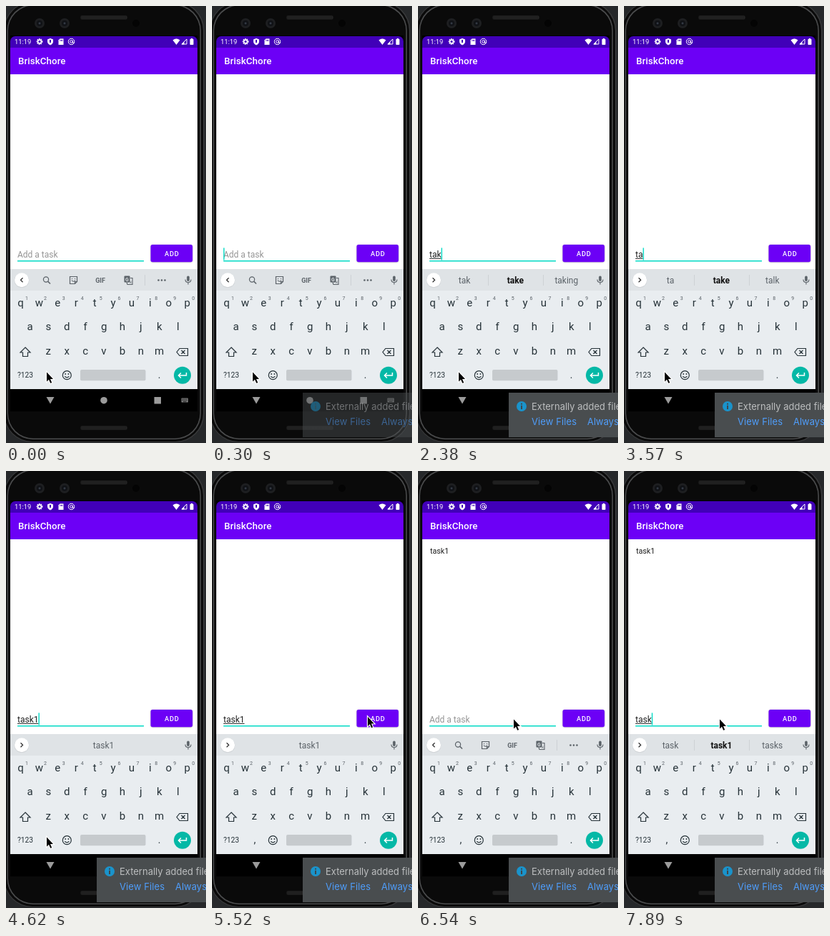
Write an HTML page with a canvas that moves like this. It is 280 px wide and 608 px high and loops after 8000 ms.

```html
<!DOCTYPE html>
<html lang="en">
<head>
<meta charset="utf-8">
<style>
  html, body { margin: 0; width: 280px; height: 608px; overflow: hidden; background: #26282a; }
  canvas { display: block; }
</style>
</head>
<body>
<canvas id="stage" width="280" height="608"></canvas>
<script>
const ctx = document.getElementById('stage').getContext('2d');
const LOOP = 8000;
const KEY = '#263238', ICON = '#5b6268', TEAL = '#03dac5', PURPLE = '#6c00f6';

// time, typed text, caret visible, suggestions
const typing = [
  [0, '', 0], [300, '', 1], [890, '', 0], [1490, '', 1],
  [1940, 't', 1, 't to the'], [2090, 'ta', 1, 'ta take talk'],
  [2230, 'tak', 1, 'ta take talk'], [2380, 'tak', 1, 'tak take taking'],
  [2530, 'taks', 1, 'taks takes talks'], [3130, 'taks', 0, 'taks takes talks'],
  [3280, 'tak', 1, 'tak take taking'], [3570, 'ta', 1, 'ta take talk'],
  [4020, 'task', 1, 'task tasks talk'], [4620, 'task1', 1, 'task1'],
  [5220, 'task1', 0, 'task1'], [5960, '', 1], [6540, '', 0],
  [6990, 't', 1, 't to the'], [7140, 'ta', 1, 'ta take talk'],
  [7590, 'tas', 1, 'tas task talk'], [7890, 'task', 1, 'task task1 tasks']
];
// time, pointer x, pointer y
const pointer = [[0, 57, 509.5], [5370, 150, 421], [5520, 218, 342], [6390, 178, 345], [6540, 134, 345.5]];
// time, ripple radius, ripple opacity
const ripple = [[0, 0, 0], [5660, 14, .25], [5810, 32, .28], [5960, 50, .2], [6100, 50, .1], [6240, 0, 0]];

const at = (steps, t) => steps.findLast(s => s[0] <= t);

function rect(x, y, w, h, fill, r = 0) {
  ctx.fillStyle = fill;
  ctx.beginPath();
  ctx.roundRect(x, y, w, h, r);
  ctx.fill();
}

function circle(x, y, r, fill) {
  rect(x - r, y - r, 2 * r, 2 * r, fill, r);
}

function draw(d, x, y, fill, stroke, width = 1.2) {
  const path = new Path2D(d);
  ctx.save();
  ctx.translate(x, y);
  if (stroke) {
    ctx.strokeStyle = stroke;
    ctx.lineWidth = width;
    ctx.stroke(path);
  }
  if (fill) {
    ctx.fillStyle = fill;
    ctx.fill(path);
  }
  ctx.restore();
}

function ring(x, y, r, color, width = 1.2) {
  draw(`M${r} 0A${r} ${r} 0 1 1 ${-r} 0A${r} ${r} 0 1 1 ${r} 0`, x, y, null, color, width);
}

function text(s, x, y, size, color, { weight = 400, align = 'left', font = 'Roboto', spacing = 0 } = {}) {
  ctx.font = `${weight} ${size}px ${font}, sans-serif`;
  ctx.letterSpacing = spacing + 'px';
  ctx.textAlign = align;
  ctx.fillStyle = color;
  ctx.fillText(s, x, y);
  return ctx.measureText(s).width;
}

function grille(y) {
  rect(104, y, 66, 6, '#1b1b1b', 3);
  for (let i = 0; i < 32; i++)
    for (let j = 0; j < 2; j++) rect(106 + i * 2, y + 1.5 + j * 2, 1, 1, '#303030');
}

function phone() {
  rect(0, 0, 280, 608, '#26282a');
  rect(-3, -6, 280.5, 613, '#3a3b3c', 40);
  rect(-2, -5, 278, 611, '#0a0a0a', 39);
  rect(1.5, -2, 271.5, 605, '#4b4c4d', 36);
  rect(3, -.5, 268.5, 602, '#0a0a0a', 35);
  grille(13);
  grille(584);
  for (const x of [47, 82]) {
    circle(x, 24, 7, '#1e1f21');
    circle(x, 24, 4, '#101216');
    circle(x, 24, 1.5, '#343a45');
  }
  circle(182, 24, 5, '#040404');
  rect(6, 41, 262, 523, '#000');
}

function statusBar() {
  rect(6, 42, 262, 16, '#4100b8', [7, 7, 0, 0]);
  text('11:19', 12, 53, 9.3, '#fff');
  ctx.setLineDash([1.5, 1.1]);
  ring(47, 49.5, 3.6, '#fff', 1.6);
  ctx.setLineDash([]);
  ring(47, 49.5, 2.4, '#fff', 1.6);
  draw('M0-4.5L4-3V0Q4 3 0 5Q-4 3-4 0V-3Z', 62, 49.5, '#fff');
  rect(61, 47, 2, 4, '#4100b8');
  draw('M-1.5-4H3.5V4.5H-3.5V-2Z', 77, 49.5, '#fff');
  for (const x of [75.5, 77, 78.5]) rect(x, 47, .8, 2, '#4100b8');
  ring(91.5, 49.5, 4.2, '#fff', 1);
  ring(91.5, 49.5, 1.8, '#fff', 1);
  draw('M1.8-1.5V1.8H4', 91.5, 49.5, null, '#fff', 1);
  draw('M-5-2Q0-6 5-2L0 4.5Z', 238.5, 49.5, '#fff');
  draw('M3.5-3.5V3.5H-3.5Z', 249.5, 49.5, null, '#fff', 1);
  draw('M0 0V4H-4Z', 249.5, 49.5, '#fff');
  rect(257.5, 46, 5, 8, '#fff', .7);
  rect(258.8, 45, 2.4, 2, '#fff');
}

function appBar() {
  rect(6, 58, 262, 37, PURPLE);
  text('BriskChore', 17, 81, 13.3, '#fff', { weight: 500, spacing: .1 });
}

function inputRow(typed, caret, [, radius, opacity]) {
  rect(16, 354, 177, 1.6, TEAL);
  let width = 0;
  if (typed) {
    width = text(typed, 16, 350, 12, '#202020');
    rect(16, 351, width, 1, '#333');
  } else {
    text('Add a task', 16, 350, 12, '#959595');
  }
  if (caret) rect(16 + width, 336.5, 1.4, 17, TEAL);

  ctx.save();
  ctx.shadowColor = '#0004';
  ctx.shadowBlur = 2;
  ctx.shadowOffsetY = .5;
  rect(202.5, 332, 58.7, 24.3, PURPLE, 2.7);
  ctx.restore();
  ctx.save();
  ctx.beginPath();
  ctx.roundRect(202.5, 332, 58.7, 24.3, 2.7);
  ctx.clip();
  circle(220, 343, radius, `rgba(255,255,255,${opacity})`);
  ctx.restore();
  text('ADD', 232.3, 347.7, 9.3, '#fff', { weight: 500, align: 'center', spacing: .8 });
}

function toolbar() {
  ring(56, 380.5, 3.6, ICON);
  draw('M2.6 2.6L6 6', 56, 380.5, null, ICON, 1.5);
  draw('M-5-5H5V2L2 5H-5ZM5 2H2V5M-2.5 0Q0 3.5 2.5 0M-2-2.5V-1.5M2-2.5V-1.5', 94.5, 381.5, null, ICON);
  text('GIF', 132, 384.5, 9, ICON, { weight: 700, align: 'center' });
  rect(165.5, 375.5, 8, 9, ICON, 1);
  draw('M3-3H6V6H-1L-2 3', 171, 381.5, null, ICON, 1.1);
  text('G', 169.5, 383, 7, '#e1e5e8', { weight: 700, align: 'center' });
  text('x', 174.5, 386, 6, ICON, { align: 'center' });
  rect(194, 374, 1, 15, '#cdd1d5');
  for (const x of [213.5, 218, 222.5]) circle(x, 381.5, 1.3, ICON);
}

function suggestions(words) {
  if (words.length === 1) {
    text(words[0], 136.5, 386, 12, ICON, { align: 'center' });
    return;
  }
  words.forEach((word, i) => text(word, 65 + i * 71.4, 386, 12,
    i === 1 ? '#111' : ICON, { weight: i === 1 ? 700 : 400, align: 'center' }));
  for (const x of [98, 175]) rect(x, 374, 1, 15, '#cdd1d5');
}

function keyboard(words) {
  rect(6, 366, 262, 30, '#dfe3e6');
  rect(6, 396, 262, 137, '#e9edf0');
  circle(22, 381.7, 10.3, '#c9cdd1');
  circle(22, 381.2, 10, '#fff');
  draw(words ? 'M-1.5-3L1.5 0L-1.5 3' : 'M1.5-3L-1.5 0L1.5 3', 22, 381.2, null, '#333', 1.3);
  words ? suggestions(words.split(' ')) : toolbar();
  rect(253.2, 375.5, 3.6, 7.5, ICON, 1.8);
  draw('M-4-1Q-4 3 0 3Q4 3 4-1M0 3V6', 255, 381.5, null, ICON, 1.1);

  [['qwertyuiop', 20.5, 418], ['asdfghjkl', 33.5, 451], ['zxcvbnm', 59.3, 485]].forEach(([keys, x, y], row) => {
    [...keys].forEach((key, i) => {
      text(key, x + i * 25.9, y, 15, KEY, { align: 'center' });
      if (!row) text((i + 1) % 10, x + 8.5 + i * 25.9, 408.5, 7, ICON, { align: 'center' });
    });
  });
  draw('M0-6.5L7 .5H3.5V6H-3.5V.5H-7Z', 27, 481.5, null, KEY);
  draw('M-4-5H7.5V5H-4L-8 0ZM-1.5-2.5L3.5 2.5M3.5-2.5L-1.5 2.5', 247, 481.5, null, KEY);

  text('?123', 27, 517.3, 10.2, KEY, { align: 'center' });
  text(',', 60, 517.5, 14, KEY, { align: 'center' });
  ring(85.3, 513.7, 6, KEY);
  draw('M-3 1.5Q0 5 3 1.5', 85.3, 513.7, null, KEY);
  circle(83.2, 512, .9, KEY);
  circle(87.4, 512, .9, KEY);
  rect(104, 506, 91.5, 15.3, '#c6cacd', 2);
  text('.', 214.5, 517.5, 14, KEY, { align: 'center' });
  circle(247, 513.7, 12, '#04b8a6');
  draw('M5.5-3.5V.5H-5M-2-3L-5.5 .5L-2 4', 247, 513.5, null, '#fff', 1.5);
}

function navBar() {
  draw('M-5.5-4.5H5.5L0 5Z', 62, 548.5, '#9b9b9b');
  circle(137, 548.7, 4.8, '#9b9b9b');
  rect(207.5, 544, 9.5, 9.5, '#9b9b9b');
  rect(245.5, 545.5, 9.5, 6, '#777', .7);
  for (let i = 0; i < 4; i++)
    for (let j = 0; j < 2; j++) rect(246.6 + i * 2, 546.4 + j * 1.7, 1, 1, '#111');
  rect(248, 549.9, 4.5, .8, '#111');
}

function notification(opacity) {
  const ui = { font: 'Inter' };
  ctx.save();
  ctx.globalAlpha = opacity;
  rect(127, 538, 160, 62, '#494d4f');
  circle(145, 557, 7, '#1a93cb');
  rect(144.1, 552.7, 1.9, 1.9, '#3f4346');
  rect(144.1, 555.8, 1.9, 5.2, '#3f4346');
  text('Externally added files', 159, 562, 13, '#bcbebf', ui);
  text('View Files', 159, 583, 13, '#4f9dfa', { ...ui, spacing: .1 });
  text('Always Add', 237, 583, 13, '#4f9dfa', ui);
  ctx.restore();
}

function render(t) {
  const [, typed, caret, words] = at(typing, t);
  const [, px, py] = at(pointer, t);
  phone();
  statusBar();
  rect(6, 95, 262, 271, '#fff');
  appBar();
  if (t >= 5960) text('task1', 17, 115, 10.67, '#202020');
  inputRow(typed, caret, at(ripple, t));
  keyboard(words);
  navBar();
  if (t >= 300) notification(t < 450 ? .5 : 1);
  draw('M0 0V13L3 10.3L5.2 15.3L7.2 14.4L5 9.5H9Z', px, py, '#000', '#fff', 2.2);
}

function tick() {
  render(performance.now() % LOOP);
  requestAnimationFrame(tick);
}
tick();
</script>
</body>
</html>
```
